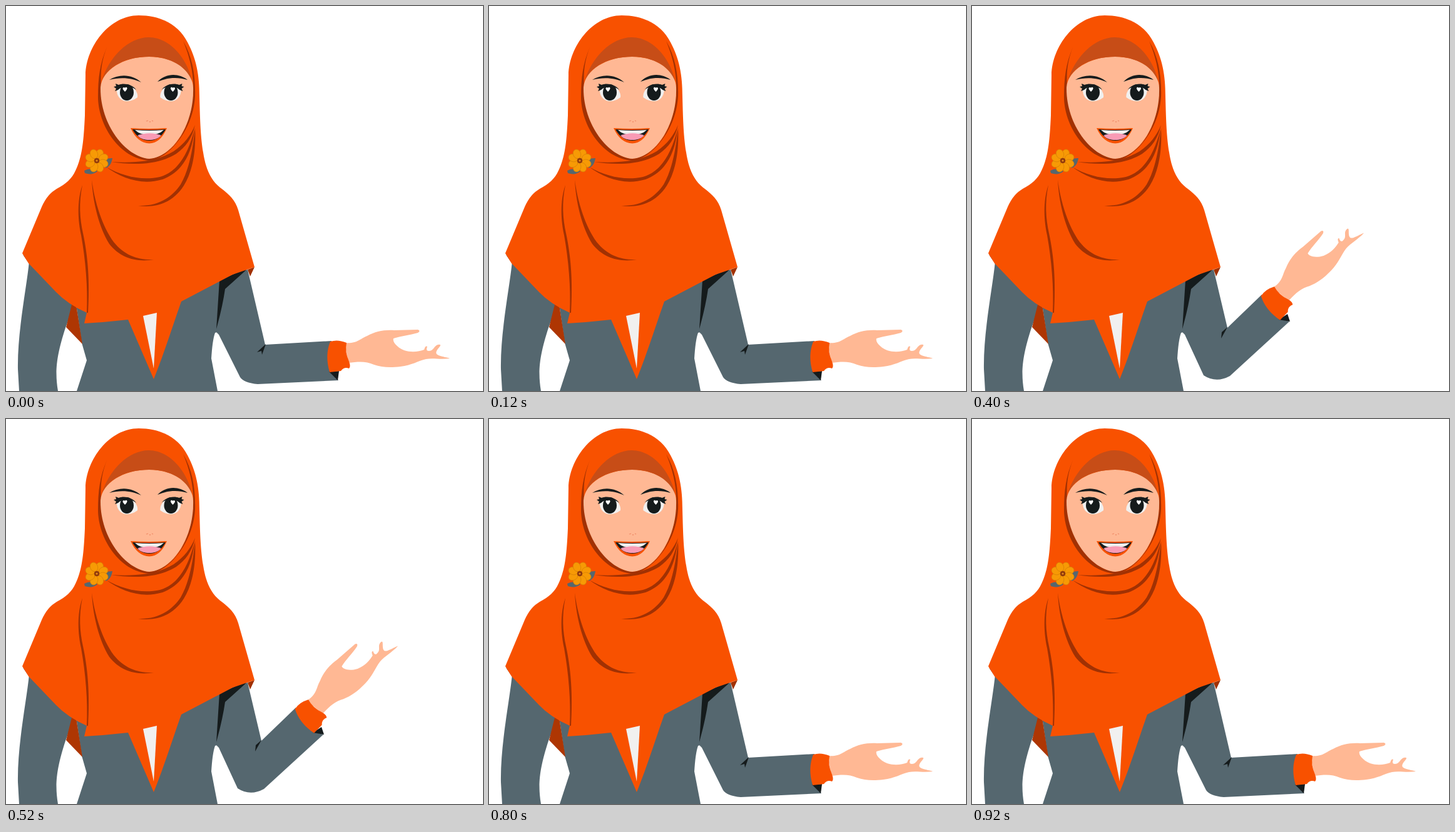
Write an HTML page that moves like this. It is 762 px wide and 615 px high and loops after 1 s.

```html
<!DOCTYPE html>
<html lang="en">
<head>
<meta charset="utf-8">
<title>Presenter</title>
<style>
  html, body { margin: 0; width: 100%; height: 100%; overflow: hidden; background: #fff; }
  svg { display: block; width: 100%; height: 100%; }
  .cloth { fill: #55676f; }
  .scarf { fill: #f85100; }
  .fold { fill: #a13103; }
  .skin { fill: #ffb894; }
  .ink { fill: #151b1c; }
  .pale { fill: #f1f0ef; }
</style>
</head>
<body>
<svg viewBox="0 0 762 615" preserveAspectRatio="none">
  <!-- jacket -->
  <path class="cloth" d="M37 408C33 450 18 520 19 580L21 615H83C78 585 80 560 95 514L111 470L121 538L129 566L113 615H338L328 563C329 545 331 530 334 522L337 521L350 430L230 470L130 470Z"/>
  <path d="M106 473L96 513L122 540L112 477Z" fill="#ae3603"/>

  <!-- moving arm -->
  <path id="sleeve" class="cloth"/>
  <path id="crease" class="ink"/>
  <path id="lining" class="ink"/>
  <g id="hand">
    <path class="skin" d="M541 538C561 540 566 531 577 527C590 520 603 517 620 518L658 517Q663 519 658 522C645 526 631 527 619 531C617 536 624 545 636 550C648 554 660 552 668 549Q670 542 673 544Q670 551 675 551C684 551 683 543 690 541Q696 540 693 544C688 550 684 555 691 558C699 561 704 561 709 563C694 565 682 562 671 564C658 567 648 574 630 576C612 578 600 577 588 573C575 567 563 568 547 570Z"/>
    <path class="scarf" d="M518 536Q530 532 544 538Q541 552 548 568Q551 576 548 579Q540 576 535 583L517 585Q509 558 518 536Z"/>
  </g>

  <path class="ink" d="M341 438L389 417L350 452Q346 480 336 516Z"/>
  <path class="fold" d="M386 421L397 417L390 432Z"/>
  <path class="ink" d="M27 397L38 413L36 405Z"/>

  <!-- scarf -->
  <path class="scarf" d="M212 15C245 15 275 28 290 58C304 84 309 110 309 145C310 185 311 210 315 234C319 260 327 278 342 290C358 302 366 310 371 326L397 417L362 429L280 472C266 512 250 562 236 596L195 501Q160 505 125 507L129 490Q98 476 80 457L36 411L26 395L57 321C63 307 71 298 81 292C96 284 105 276 111 263C121 242 124 220 126 175L127 110C128 65 165 15 212 15Z"/>
  <path class="pale" d="M219 495L241 490L236 579Z"/>
  <g class="fold">
    <path d="M161 66C151 92 151 110 152 130C154 185 190 241 229 244C270 240 298 190 299 135C300 108 294 82 283 56C298 82 303 112 302 145C299 196 262 243 229 247C181 244 147 190 147 145C147 115 150 92 161 66Z"/>
    <path d="M168 249C205 251 240 249 268 232C285 220 295 207 302 190C297 212 287 225 272 236C242 255 200 254 168 249Z"/>
    <path d="M160 257C188 273 218 279 246 273C274 265 291 237 301 197C297 240 279 266 250 277C216 287 185 275 160 257Z"/>
    <path d="M211 319C242 320 264 307 279 285C291 264 298 235 302 195C304 235 297 266 284 287C266 315 239 323 211 319Z"/>
    <path d="M137 278C142 315 154 352 172 377C189 398 210 406 236 405C208 410 182 402 165 380C149 354 139 316 137 278Z"/>
    <path d="M122 286C116 315 118 340 123 363C131 400 134 440 131 490H129C131 450 127 405 120 366C115 343 113 312 122 286Z"/>
  </g>

  <!-- face -->
  <path class="skin" d="M151 130C153 102 188 81 228 81C268 81 298 102 299 130C301 190 265 242 229 244C190 241 150 188 151 130Z"/>
  <path fill="#c74d17" d="M152 122C164 81 196 50 228 50C260 50 289 81 298 122C289 96 262 81 229 81C194 81 162 95 152 122Z"/>
  <path class="ink" d="M165 118C181 108 202 109 216 122C202 115 184 113 165 118Z"/>
  <path class="ink" d="M242 121C255 107 276 107 290 118C274 113 258 114 242 121Z"/>
  <g id="eyes"></g>
  <path d="M224 184L227 183M229 185H231M233 183L235 184" stroke="#f08a68" stroke-width="1.3"/>
  <path class="scarf" d="M199 195Q228 197 257 195Q247 219 229 219.500Q210 219 199 195Z"/>
  <path class="ink" d="M202 197Q228 199 255 197Q245 215 229 215Q212 215 202 197Z"/>
  <path class="pale" d="M206 198Q229 200 252 198Q244 206 229 206Q214 206 206 198Z"/>
  <path d="M210 207C222 202 237 202 248 207C241 213 236 214 229 214C222 214 216 213 210 207Z" fill="#f99bb5"/>

  <!-- brooch -->
  <path class="cloth" d="M125 263Q136 257 146 264Q138 271 126 267ZM159 244L170 243Q168 256 159 259Z"/>
  <g id="petals" fill="#f79a05" stroke="#d98207" stroke-width=".8"></g>
  <circle cx="145" cy="247" r="4" fill="#8e3a0c"/>
  <circle cx="145" cy="247" r="1.6" fill="#e88a1a"/>
</svg>
<script>
const $ = id => document.getElementById(id);

const eye = (x, flip) => `<g transform="translate(${x} 138) scale(${flip} 1)">
  <path class="pale" d="M-16 -6C-8 -14 8 -14 13 -5Q18 2 17 8Q9 14 0 14C-10 14 -17 6 -16 -6Z"/>
  <ellipse class="ink" rx="11" ry="13"/>
  <path class="ink" d="M15 -4C8 -14 -6 -15 -13 -12L-18 -14L-17 -10L-21 -9L-17 -6L-19 -2L-14 -4C-8 -10 6 -12 15 -4Z"/>
  <path fill="#fff" d="M-3 -1Q-9 -7 -5 -8Q-3 -8 -3 -7Q-2 -9 0 -8Q2 -6 -3 -1Z"/>
</g>`;
$('eyes').innerHTML = eye(193, 1) + eye(263.5, -1);

$('petals').innerHTML = Array.from({ length: 8 }, (_, i) =>
  `<ellipse cx="145" cy="235.5" rx="6" ry="7.5" transform="rotate(${i * 45 + 22} 145 247)"/>`).join('');

// Each pose: hand angle, cuff corner, sleeve outline, elbow crease, sleeve lining
const poses = [
  {
    angle: 0, x: 531, y: 597,
    sleeve: 'M345 438L386 421L414 541L520 535L519 584L531 598L402 604Q380 602 374 593L340 525L336 521Z',
    crease: 'M415 540L401 553L408 551L409 557Z',
    lining: 'M516 584L532 583L530 598Z'
  },
  {
    angle: -19.5, x: 535.6, y: 548.8,
    sleeve: 'M345 438L386 421L413 535L506 494L521 542L535 550L418 598Q398 605 376 598L340 525L336 521Z',
    crease: 'M413 534L405 537L404 545L407 553Z',
    lining: 'M520 542L533 536L535 550Z'
  },
  {
    angle: -39.5, x: 510.5, y: 502,
    sleeve: 'M345 438L386 421L408 514L463 461L493 500L507 504L412 591Q390 603 370 590L340 525L336 521Z',
    crease: 'M408 513L399 521L398 531Z',
    lining: 'M490 501L504 492L508 504Z'
  }
];
const order = [0, 1, 2, 1, 0];
const hold = 200;

function draw(time) {
  const pose = poses[order[Math.floor(time / hold) % order.length]];
  for (const part of ['sleeve', 'crease', 'lining']) $(part).setAttribute('d', pose[part]);
  $('hand').setAttribute('transform',
    `translate(${pose.x} ${pose.y}) rotate(${pose.angle}) translate(-531 -597)`);
}

let start;
function tick(now) {
  start ??= now;
  draw(Math.max(0, now - start));
  requestAnimationFrame(tick);
}
draw(0);
requestAnimationFrame(tick);
</script>
</body>
</html>
```
